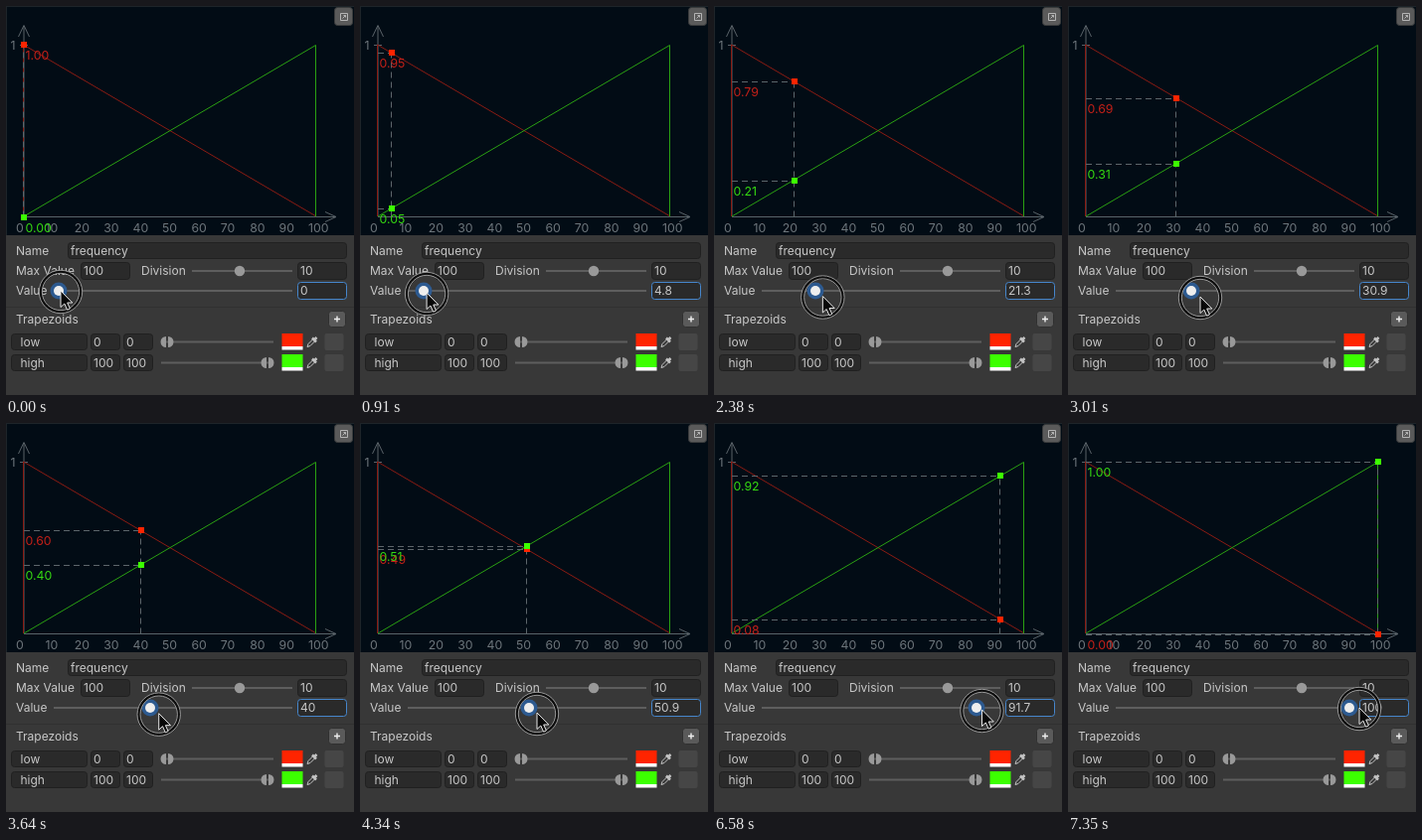
These frames come from a looping animation (350x392 px, 7420 ms). An HTML page:

```html
<!DOCTYPE html>
<html lang="en">
<head>
<meta charset="utf-8">
<title>Trapezoid editor</title>
<style>
  html, body { margin: 0; width: 100%; height: 100%; overflow: hidden; background: #383838; }
  svg { display: block; width: 350px; height: 392px; }
  text { font: 12px Inter, Arial, sans-serif; fill: #c8c8c8; white-space: pre; }
  .axis { fill: none; stroke: #5a6369; }
  .scale text { fill: #6d757b; font-size: 12.3px; }
  .guide { fill: none; stroke: #5d666b; stroke-dasharray: 6 4; }
  .field { fill: #2a2a2a; stroke: #202020; }
  .track { fill: none; stroke: #5e5e5e; stroke-width: 2; }
  .thumb { fill: #999; }
  .button { fill: #5a5a5a; stroke: #303030; }
  .low { fill: #ff2400; }
  .high { fill: #3cff00; }
  text.low { fill: #c42018; font-size: 12.3px; }
  text.high { fill: #35d911; font-size: 12.3px; }
  .line { fill: none; stroke-width: 1; }
  .ring { fill: none; stroke: #a4a4a4; stroke-width: .9; }
</style>
</head>
<body>
<svg viewBox="0 0 350 392">
  <defs>
    <g id="range">
      <path class="thumb" d="M-1-5.5a5.5 5.5 0 0 0 0 11zM1-5.5a5.5 5.5 0 0 1 0 11z"/>
    </g>
    <g id="picker" fill="none" stroke="#c4c4c4">
      <path d="M1 11.5l1-3 5-5 2 2-5 5z"/>
      <path d="M6 2.5l4 4M8 4.5l2.5-2.5" stroke-width="2.5"/>
    </g>
    <g id="row">
      <rect class="field" x="5.5" y=".5" width="76" height="16" rx="3"/>
      <rect class="field" x="85.5" y=".5" width="29" height="16" rx="3"/>
      <rect class="field" x="118.5" y=".5" width="29" height="16" rx="3"/>
      <path class="track" d="M156 8.5H269"/>
      <rect x="277.5" y="13" width="21" height="3.5" fill="#fff"/>
      <use href="#picker" x="302" y="2"/>
      <rect x="320.5" width="19" height="17" rx="2" fill="#464646"/>
    </g>
  </defs>

  <rect width="350" height="392" fill="#383838"/>
  <rect width="350" height="231" fill="#020c15"/>
  <path d="M0 .5H350M.5 0V231" stroke="#1d2429" fill="none"/>
  <path d="M0 303.5H350" stroke="#313131"/>

  <g class="axis">
    <path d="M18 212V20M12.5 31L18 19.5L23.5 31M14 39.5H22"/>
    <path d="M18 212.5H332M321 207.5L332 212.5L321 217.5"/>
  </g>
  <g class="scale" id="scale"><text x="4.5" y="43.5">1</text></g>

  <path class="line" stroke="#8a1b13" d="M17.5 212V39L312 212"/>
  <path class="line" stroke="#2aa012" d="M18 212L311.5 39.5V212"/>
  <path class="guide" id="guides"/>
  <rect class="low" id="lowDot" width="6" height="6"/>
  <rect class="high" id="highDot" width="6" height="6"/>
  <text class="low" id="lowText" x="19.5"></text>
  <text class="high" id="highText" x="19.5"></text>

  <rect x="330.5" y="1.5" width="18" height="18" rx="3" fill="#5a5a5a" stroke="#3a3c3d"/>
  <path d="M336.5 7.5h7v7h-7zM338.5 12.5l3-3M339.5 9.5h2v2" fill="none" stroke="#b4b4b4"/>

  <text x="10" y="251">Name</text>
  <rect class="field" x="62.5" y="238.5" width="280" height="16" rx="3"/>
  <text x="65" y="251">frequency</text>

  <text x="10" y="271">Max Value</text>
  <rect class="field" x="75.5" y="258.5" width="49" height="17" rx="3"/>
  <text x="78" y="271">100</text>
  <text x="136" y="271">Division</text>
  <path class="track" d="M187 267H288"/>
  <circle class="thumb" cx="235" cy="267" r="5.2"/>
  <rect class="field" x="293.5" y="258.5" width="49" height="17" rx="3"/>
  <text x="296" y="271">10</text>

  <text x="10" y="291">Value</text>
  <path class="track" d="M48 287H288"/>
  <rect x="293.5" y="278.5" width="49" height="17" rx="3" fill="#2a2a2a" stroke="#4686cc"/>
  <text id="valueText" x="296" y="291"></text>
  <g id="knob">
    <circle r="8.5" fill="#2d5a90"/>
    <circle r="5" fill="#eee"/>
  </g>

  <text x="10" y="319.5">Trapezoids</text>
  <rect class="button" x="324.5" y="307.5" width="17" height="16" rx="3"/>
  <path d="M330 315.5h6M333 312.5v6" stroke="#eee" stroke-width="1.4"/>

  <use href="#row" y="330"/>
  <rect class="low" x="277.5" y="330" width="21" height="13"/>
  <use href="#range" x="162" y="338.5"/>
  <text x="14.5" y="343">low</text>
  <text x="88" y="343">0</text>
  <text x="121" y="343">0</text>

  <use href="#row" y="351"/>
  <rect class="high" x="277.5" y="351" width="21" height="13"/>
  <use href="#range" x="263" y="359.5"/>
  <text x="14.5" y="364">high</text>
  <text x="88" y="364">100</text>
  <text x="121" y="364">100</text>

  <g id="pointer">
    <circle r="20.2" fill="none" stroke="#0c0c0c" stroke-width="3"/>
    <circle class="ring" r="21.7"/>
    <circle class="ring" r="18.7"/>
    <path d="M0-1V15.5L3.8 12L6.6 18.2L9.4 17L6.7 11H11.8Z" fill="#080808" stroke="#e8e8e8"/>
  </g>
</svg>
<script>
  const LOOP = 7420, STEP = 70;
  const LEFT = 18, BASE = 212.5, WIDTH = 294, HEIGHT = 173.5;
  const TRAVEL = 230;
  const $ = id => document.getElementById(id);

  // The drag: time, slider offset, pointer lead over the knob, pointer height
  const keys = [
    [0, 0, 2, 288], [1750, 31, 5, 292.5], [3010, 71, 9, 294], [4340, 117, 8, 293],
    [5460, 164, 5, 292], [6580, 211, 5.5, 290], [7350, 230, 10, 288]
  ];

  function slope(i, c) {
    if (i === 0 || i === keys.length - 1) return 0;
    const rate = k => (keys[k + 1][c] - keys[k][c]) / (keys[k + 1][0] - keys[k][0]);
    const a = rate(i - 1), b = rate(i);
    return a * b > 0 ? 2 * a * b / (a + b) : 0;
  }

  function track(c, t) {
    let i = 0;
    while (i < keys.length - 2 && t >= keys[i + 1][0]) i++;
    const a = keys[i], b = keys[i + 1], span = b[0] - a[0];
    const s = (t - a[0]) / span, ease = s * s * (3 - 2 * s);
    return a[c] + (b[c] - a[c]) * ease
      + span * s * (1 - s) * ((1 - s) * slope(i, c) - s * slope(i + 1, c));
  }

  function move(id, x, y) {
    $(id).setAttribute('transform', `translate(${x} ${y})`);
  }

  function plot(name, x, level) {
    const y = Math.round(BASE - HEIGHT * level);
    move(name + 'Dot', x - 3, y - 3);
    $(name + 'Text').setAttribute('y', y + 15);
    $(name + 'Text').textContent = (Math.round(level * 100 + 1e-6) / 100).toFixed(2);
    return y;
  }

  function draw(ms) {
    const t = Math.floor(ms % LOOP / STEP) * STEP;
    const offset = Math.round(track(1, t));
    const value = Math.round(offset / TRAVEL * 1000) / 10;
    const x = Math.round(LEFT + WIDTH * value / 100);
    const lowY = plot('low', x, 1 - value / 100);
    const highY = plot('high', x, value / 100);
    const across = y => `M${LEFT} ${y + .5}H${x}`;
    $('guides').setAttribute('d',
      across(lowY) + across(highY) + `M${x - .5} ${BASE}V${Math.min(lowY, highY)}`);
    $('valueText').textContent = value;
    move('knob', 53 + offset, 287);
    move('pointer', 53 + offset + track(2, t), track(3, t));
  }

  for (let n = 0; n <= 10; n++) {
    const label = document.createElementNS('http://www.w3.org/2000/svg', 'text');
    label.setAttribute('x', LEFT + n * WIDTH / 10 - 8);
    label.setAttribute('y', 227.5);
    label.textContent = n * 10;
    $('scale').append(label);
  }

  const start = performance.now();
  function frame() {
    draw(performance.now() - start);
    requestAnimationFrame(frame);
  }
  frame();
</script>
</body>
</html>
```
